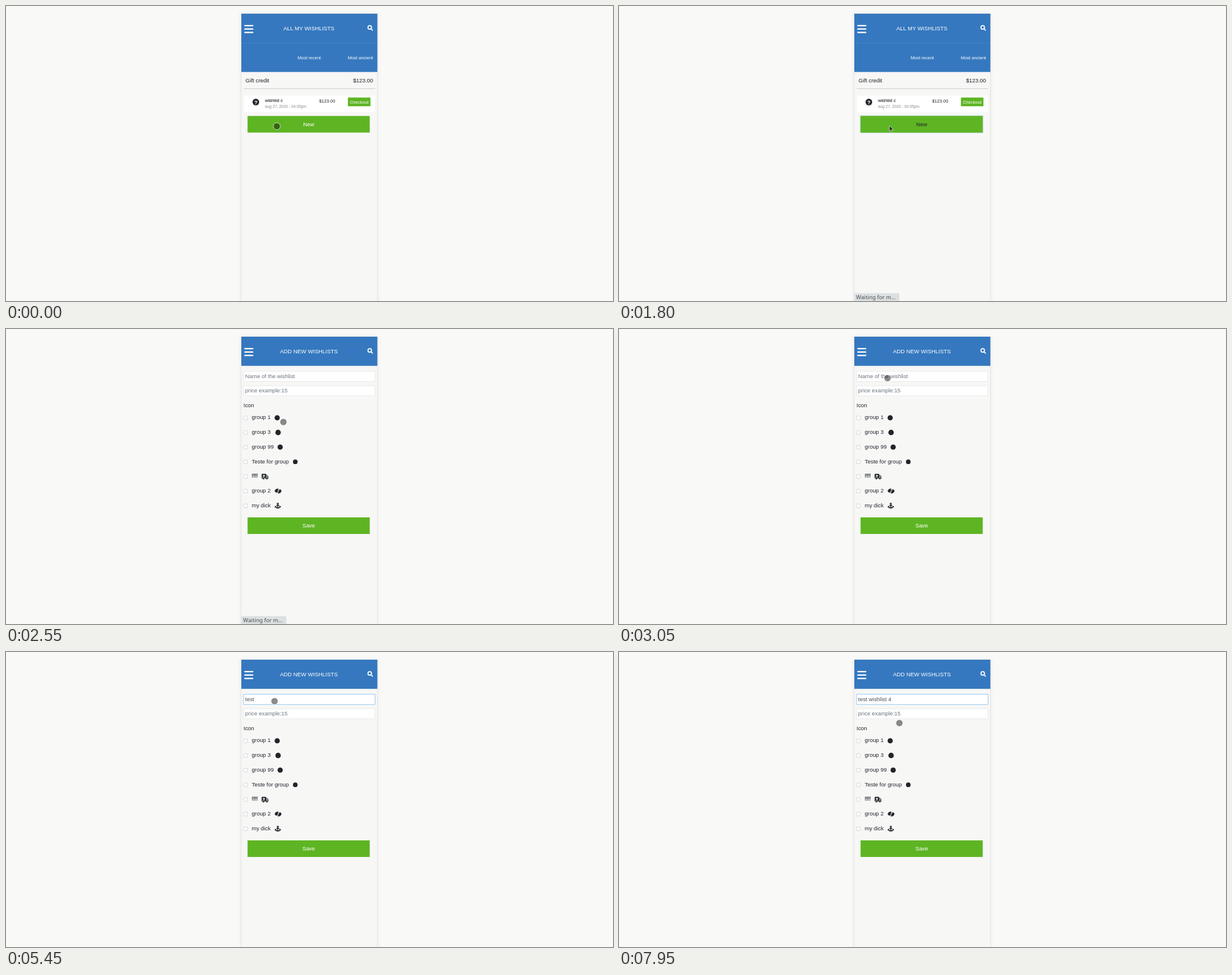
An HTML page that plays this animation: 1024 px wide and 498 px high, repeating every 8000 ms.

```html
<!DOCTYPE html>
<html lang="en">
<head>
<meta charset="utf-8">
<title>Wishlists</title>
<style>
  html, body { margin: 0; width: 100%; height: 100%; overflow: hidden; background: #f9f9f8; }
  svg { display: block; width: 100vw; height: 100vh; }
  text { font: 9.38px "Liberation Sans", Arial, sans-serif; fill: #212529; white-space: pre; }
  .small { font-size: 7.5px; }
  .date { font-size: 6.57px; fill: #868b90; }
  .light { fill: #fff; }
  .mid { text-anchor: middle; }
  .end { text-anchor: end; }
  .hint { fill: #6c757d; }
  .typed { fill: #495057; }
  .status { font: 500 9.25px "Noto Sans", "Open Sans", sans-serif; fill: #4a5054; }
  .green { fill: #5eb523; }
  .blue { fill: #3578bf; }
  .field { fill: #fff; stroke: #e6e7e7; stroke-width: .8; }
  .ink { fill: #212529; }
  .line { fill: none; stroke: #212529; stroke-width: 1.5; stroke-linecap: round; }
</style>
</head>
<body>
<svg viewBox="0 0 1024 498" preserveAspectRatio="none">
  <defs>
    <filter id="soft" x="-10%" y="-10%" width="120%" height="120%"><feGaussianBlur stdDeviation="3"/></filter>
    <clipPath id="phone"><rect x="397" y="13" width="229.5" height="485"/></clipPath>
  </defs>

  <rect x="396.5" y="12.5" width="230.5" height="520" fill="#000" opacity=".08" filter="url(#soft)"/>
  <rect x="396.6" y="12.6" width="230.3" height="520" fill="#dfdfdf"/>
  <rect x="397.2" y="13" width="229" height="485" fill="#f7f7f6"/>
  <rect class="blue" x="397" y="13" width="229.5" height="49.2"/>
  <path d="M403 33.1h13.2M403 38.9h13.2M403 44.7h13.2" stroke="#fff" stroke-width="2.3" stroke-linecap="round"/>
  <g fill="none" stroke="#fff" stroke-width="1.7" stroke-linecap="round">
    <circle cx="613.6" cy="36.2" r="3"/><path d="M616 38.7l2.3 2.3"/>
  </g>

  <g id="list">
    <rect class="blue" x="397" y="62" width="229.5" height="49.4"/>
    <path d="M397 62.3h229.5" stroke="#4d87c5" stroke-width=".7"/>
    <text class="light mid" x="511" y="41.4">ALL MY WISHLISTS</text>
    <text class="small light" x="492" y="89.6">Most recent</text>
    <text class="small light end" x="619.2" y="89.6">Most ancient</text>
    <text x="404" y="128.7">Gift credit</text>
    <text class="end" x="619.3" y="128.7">$123.00</text>
    <path d="M401 139.6h222" stroke="#c9c9c9" stroke-width=".9"/>
    <rect x="401.5" y="151.2" width="220.5" height="27.8" fill="#fff"/>
    <circle class="ink" cx="421.5" cy="162.2" r="5.6"/>
    <text class="light mid" x="421.5" y="165.6" style="font-weight:bold">?</text>
    <text class="small" x="437" y="162.2" style="fill:#000">wishlist c</text>
    <text class="date" x="437" y="171.8">aug 27, 2020 - 04:35pm</text>
    <text class="small" x="528.2" y="162.7">$123.00</text>
    <rect class="green" x="576.8" y="154.6" width="38" height="14.6" rx=".6"/>
    <text class="small light mid" x="595.8" y="164.6">Checkout</text>
    <rect id="ring" x="406.6" y="184.7" width="207.9" height="29.9" rx="1" fill="#b9d5e4"/>
    <rect class="green" x="407.5" y="185.6" width="206.1" height="28.1"/>
    <text id="new" class="mid" x="510.6" y="203">New</text>
  </g>

  <g id="form">
    <g clip-path="url(#phone)">
      <rect id="glow" x="400" y="70.4" width="223.4" height="18.8" rx="1.5" fill="#cfe5f8"/>
      <rect id="name" class="field" x="400.8" y="71.3" width="221.8" height="17.1"/>
      <rect class="field" x="400.8" y="95.8" width="221.8" height="17"/>
    </g>
    <g id="rows"></g>
    <g transform="translate(431.3 244.2)">
      <path class="ink" d="M.8.2H6.6Q7.4.2 7.4 1V2H9L11.2 4.2V7.4H11.8V8.4H0V1Q0 .2.8.2Z"/>
      <path d="M3.2 1.7h1.2v1.3h1.3v1.2H4.4v1.3H3.2V4.2H1.9V3h1.3zM8 3h.8l1.5 1.5V5H8z" fill="#f7f7f6"/>
      <g class="ink" stroke="#f7f7f6" stroke-width=".7"><circle cx="3" cy="8.1" r="1.9"/><circle cx="8.8" cy="8.1" r="1.9"/></g>
    </g>
    <g transform="translate(453 269)">
      <path class="ink" d="M0 4.2L2.3 1.2 6.2 0 6.6.9 4.6 1.8 7.4 2.1 7.2 3.1 5 3.2 6.5 4.3 5.9 5 4.6 4.6 5 6 3.8 7.2 1.8 6.8Z"/>
      <path class="ink" d="M12 4.6L9.8 7.7 5.8 9 5.4 8.1 7.4 7.1 4.8 6.9 5 5.9 7 5.7 6.5 4.5 7.5 3.9 8.2 2 9.4 1.6 10.4 2.2Z"/>
    </g>
    <g class="line" transform="translate(458.5 293.5)">
      <circle cx="0" cy="1.6" r="1.2" stroke-width="1.2"/>
      <path d="M0 3v5.8M-2 4.6h4M-4 6.2Q-3.4 8.8 0 8.8T4 6.2"/>
      <path d="M-5 7l1-1.6 1.5 1.2M5 7L4 5.4 2.5 6.6" stroke-width=".9"/>
    </g>
    <g id="labels">
      <text class="light mid" x="511" y="41.4">ADD NEW WISHLISTS</text>
      <text class="hint" x="403.6" y="107.3">price example:15</text>
      <text x="400.8" y="132.2">Icon</text>
    </g>
    <text id="value" x="403.6" y="82.9"></text>
    <rect id="caret" y="75" width=".7" height="10" fill="#495057"/>
    <rect class="green" x="407.5" y="318" width="206.1" height="28"/>
    <text id="save" class="light mid" x="510.6" y="335">Save</text>
    <rect id="bar" x="622.2" y="13.4" width="1.6" height="442.6" rx=".8" fill="#777"/>
  </g>

  <g id="status">
    <path d="M397 498V484.8h74q2 0 2 2V498z" fill="#dde0e1"/>
    <text class="status" x="400" y="495">Waiting for m…</text>
  </g>

  <g id="cursor">
    <circle id="touch" r="5.8" fill="#000" fill-opacity=".45" stroke="#fff" stroke-opacity=".65" stroke-width="1"/>
    <path id="arrow" d="M-.6-.9V8.2L1.5 6.3 2.9 9.4 4.4 8.7 3 5.7 5.8 5.5Z" fill="#222" stroke="#fff" stroke-width=".6"/>
  </g>
</svg>

<script>
const LOOP = 8000, STEP = 50, LEFT = 403.6;
const el = id => document.getElementById(id);
const show = (id, on) => { el(id).style.display = on ? '' : 'none'; };
const ramp = (t, a, b) => Math.min(1, Math.max(0, (t - a) / (b - a)));
const mix = (a, b, k) => `rgb(${a.map((v, i) => Math.round(v + (b[i] - v) * k))})`;

const groups = ['group 1', 'group 3', 'group 99', 'Teste for group', 'ffff', 'group 2', 'my dick'];
const badges = [[457.5, 4.4], [459, 4.6], [462.5, 4.4], [488, 3.9]];   // x, radius
groups.forEach((name, i) => {
  const y = 150 + i * 24.75;
  el('rows').innerHTML += `<rect x="401" y="${y - 3.1}" width="6.2" height="6.2" rx=".6" fill="#fff" stroke="#c5c7c8" stroke-width=".7"/>`;
  if (badges[i]) el('rows').innerHTML += `<circle class="ink" cx="${badges[i][0]}" cy="${y - .1}" r="${badges[i][1]}"/>`;
  el('labels').innerHTML += `<text x="414.6" y="${y + 2.4}">${name}</text>`;
});

const phrase = 'test wishlist 4';
const keys = [4050, 4150, 4350, 4450, 4950, 5750, 5800, 5950, 6050, 6250, 6450, 6550, 6600, 6750, 7000];
const path = [
  [0, 456.8, 203], [2350, 456.8, 203], [2550, 468, 157], [2800, 453, 83],
  [7600, 453, 83], [7800, 468, 154], [7900, 468, 154], [7950, 473, 120], [LOOP, 473, 120]
];

function position(t) {
  const i = path.findIndex(p => p[0] > t);
  const [a, b] = [path[i - 1], path[i]], k = ramp(t, a[0], b[0]);
  return [a[1] + (b[1] - a[1]) * k, a[2] + (b[2] - a[2]) * k];
}

function typing(t) {
  const count = keys.filter(k => k <= t).length;
  const value = el('value'), text = phrase.slice(0, count);
  const content = text || 'Name of the wishlist';
  if (value.textContent !== content) {
    value.textContent = content;
    value.setAttribute('class', count ? 'typed' : 'hint');
  }
  const since = t - (count ? keys[count - 1] : 3500);
  show('caret', t >= 3550 && since % 1000 < 500);
  el('caret').setAttribute('x', LEFT + (count ? value.getSubStringLength(0, count) : -.2));
}

function draw(t) {
  const next = t >= 1900, labelled = t >= 2050;
  show('list', !next);
  show('form', next);

  const press = ramp(t, 1150, 1350);
  el('new').style.fill = mix([255, 255, 255], [33, 37, 41], press);
  el('ring').style.opacity = press;

  ['labels', 'value', 'save'].forEach(id => show(id, labelled));
  el('bar').style.opacity = 1 - ramp(t, 2350, 2550);
  const focus = ramp(t, 3500, 3600);
  el('name').style.stroke = mix([230, 231, 231], [150, 200, 240], focus);
  el('glow').style.opacity = focus;
  if (next) typing(t);

  el('status').style.opacity = ramp(t, 1450, 1700) - ramp(t, 2850, 3050);

  const arrow = t >= 1700 && t < 2400, [x, y] = position(t);
  show('arrow', arrow);
  show('touch', !arrow);
  el('cursor').setAttribute('transform', `translate(${x} ${y})`);
}

const start = performance.now();
function tick() {
  const t = (performance.now() - start) % LOOP;
  draw(Math.floor(t / STEP) * STEP);
  requestAnimationFrame(tick);
}
tick();
</script>
</body>
</html>
```
